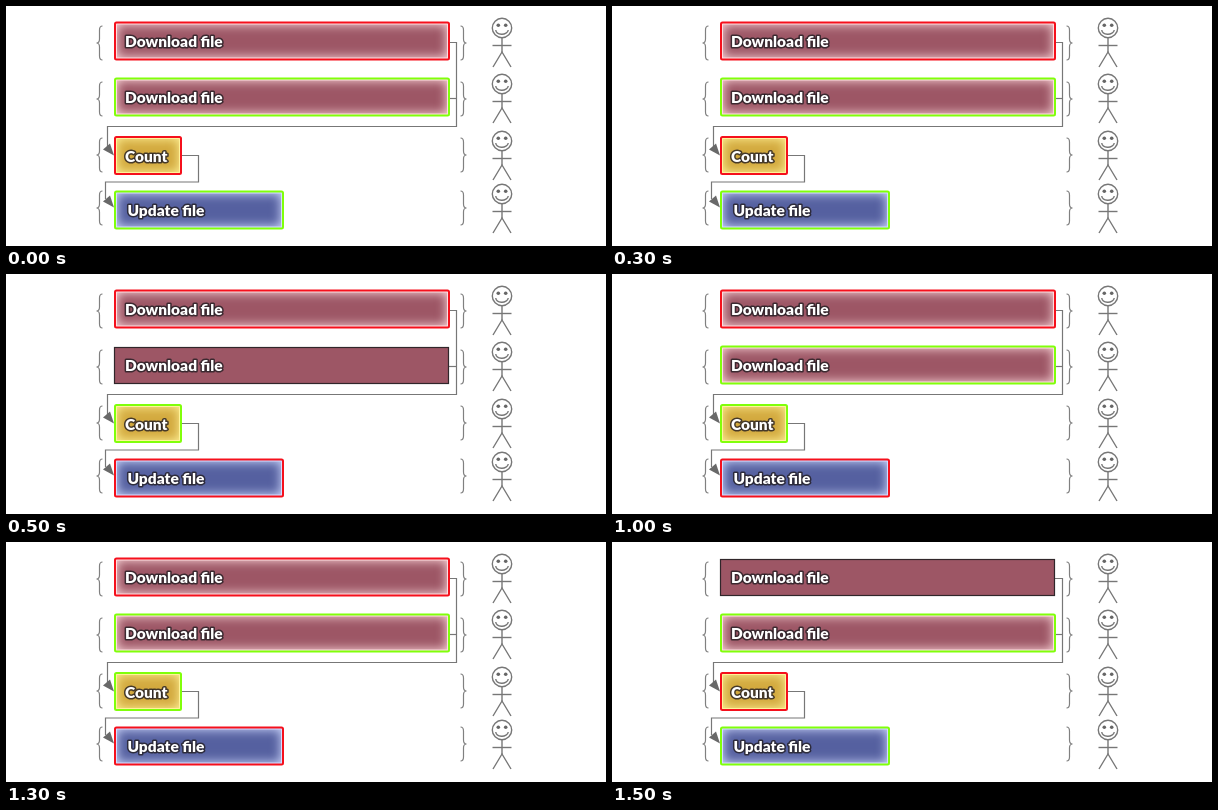
Animation of 600 by 240 pixels, one loop 2000 ms. Source, as an HTML page with a canvas:

```html
<!DOCTYPE html>
<html lang="en">
<head>
<meta charset="utf-8">
<title>Task pipeline</title>
<style>
  html, body { margin: 0; width: 100%; height: 100%; overflow: hidden; background: #fff; }
  canvas { display: block; }
</style>
</head>
<body>
<canvas id="stage" width="600" height="240"></canvas>
<script>
const ctx = document.getElementById('stage').getContext('2d');
const STEP = 500;
const RED = '#f5101c', GREEN = '#80ff0a', GRAY = '#777';
const pink = { fill: '#9d5665', glow: '#ffdcdf' };
const gold = { fill: '#d3a93e', glow: '#fff39a' };
const blue = { fill: '#5560a0', glow: '#d3dcff' };

// One highlight per step; null leaves the bar without a glow.
const bars = [
  { y: 15.5, w: 336, tone: pink, label: 'Download file', textX: 119, base: 40.5, lights: [RED, RED, RED, null] },
  { y: 71.5, w: 336, tone: pink, label: 'Download file', textX: 119, base: 96.5, lights: [GREEN, null, GREEN, GREEN] },
  { y: 130, w: 68, tone: gold, label: 'Count', textX: 119, base: 156, lights: [RED, GREEN, GREEN, RED] },
  { y: 184.5, w: 170, tone: blue, label: 'Update file', textX: 121.5, base: 210, lights: [GREEN, RED, RED, GREEN] }
];
const BAR_X = 108, BAR_H = 39;
const braceY = [20, 76, 132, 185];
const headY = [22, 78, 135, 188];

function polyline(points, width = 1.2) {
  ctx.beginPath();
  points.forEach(([x, y]) => ctx.lineTo(x, y));
  ctx.strokeStyle = GRAY;
  ctx.lineWidth = width;
  ctx.stroke();
}

function arrowhead(x, y) {
  ctx.beginPath();
  ctx.moveTo(x, y);
  ctx.lineTo(x - 11, y - 6);
  ctx.lineTo(x - 4, y - 12);
  ctx.fillStyle = '#686868';
  ctx.fill();
}

function brace(x, y, dir) {
  const mid = y + 17, end = y + 34;
  ctx.beginPath();
  ctx.moveTo(x + 3 * dir, y);
  ctx.quadraticCurveTo(x, y, x, y + 4);
  ctx.lineTo(x, mid - 4);
  ctx.quadraticCurveTo(x, mid, x - 3 * dir, mid);
  ctx.quadraticCurveTo(x, mid, x, mid + 4);
  ctx.lineTo(x, end - 4);
  ctx.quadraticCurveTo(x, end, x + 3 * dir, end);
  ctx.strokeStyle = '#808080';
  ctx.lineWidth = 1.2;
  ctx.stroke();
}

function circle(x, y, r) {
  ctx.beginPath();
  ctx.arc(x, y, r, 0, Math.PI * 2);
}

function stickFigure(x, y) {
  ctx.strokeStyle = GRAY;
  ctx.lineWidth = 1.4;
  circle(x, y, 9.7);
  ctx.stroke();
  ctx.beginPath();
  ctx.ellipse(x, y + 1.5, 6.3, 4.8, 0, 0.1, Math.PI - 0.1);
  ctx.stroke();
  ctx.fillStyle = '#666';
  for (const side of [-3.7, 3.7]) {
    circle(x + side, y - 2.8, 1.8);
    ctx.fill();
  }
  polyline([[x, y + 10], [x, y + 24]], 1.4);
  polyline([[x - 9.5, y + 17.5], [x + 9.5, y + 17.5]], 1.4);
  polyline([[x - 9, y + 39], [x, y + 24], [x + 9, y + 39]], 1.4);
}

function innerGlow(x, y, w, h, color) {
  ctx.save();
  ctx.beginPath();
  ctx.rect(x, y, w, h);
  ctx.clip();
  ctx.shadowColor = color;
  ctx.shadowBlur = 11;
  ctx.fillStyle = color;
  // The casting edge sits inside the border, so the rim stays fully lit.
  ctx.beginPath();
  ctx.rect(x - 30, y - 30, w + 60, h + 60);
  ctx.rect(x + 2, y + 2, w - 4, h - 4);
  ctx.fill('evenodd');
  ctx.restore();
}

function drawBar({ y, w, tone, label, textX, base, lights }, step) {
  const light = lights[step];
  const inner = [BAR_X + 1, y + 1, w - 2, BAR_H - 2];
  ctx.fillStyle = tone.fill;
  if (light) {
    ctx.fillRect(...inner);
    innerGlow(...inner, tone.glow);
    ctx.strokeStyle = light;
    ctx.lineWidth = 2;
    ctx.beginPath();
    ctx.roundRect(...inner, 1.5);
    ctx.stroke();
  } else {
    const plain = [BAR_X + 0.5, y + 2, w - 2, BAR_H - 3];
    ctx.fillRect(...plain);
    ctx.strokeStyle = '#30262a';
    ctx.lineWidth = 1.2;
    ctx.strokeRect(...plain);
  }

  ctx.font = '900 15.5px Lato, sans-serif';
  ctx.lineJoin = 'round';
  ctx.strokeStyle = 'rgba(35,30,35,0.8)';
  ctx.lineWidth = 3;
  ctx.strokeText(label, textX, base);
  ctx.fillStyle = '#fff';
  ctx.fillText(label, textX, base);
  ctx.lineJoin = 'miter';
}

function draw(step) {
  ctx.fillStyle = '#fff';
  ctx.fillRect(0, 0, 600, 240);

  polyline([[443, 36.5], [450.5, 36.5], [450.5, 120.5], [101.5, 120.5], [101.5, 141]]);
  polyline([[443, 92.5], [450.5, 92.5]]);
  polyline([[176, 149.5], [192.5, 149.5], [192.5, 176], [99.5, 176], [99.5, 193]]);

  braceY.forEach(y => {
    brace(93.5, y, 1);
    brace(457.5, y, -1);
  });
  headY.forEach(y => stickFigure(496, y));
  bars.forEach(bar => drawBar(bar, step));
  arrowhead(108, 149.5);
  arrowhead(108, 201.5);
}

const start = performance.now();
function tick() {
  draw(Math.floor((performance.now() - start) / STEP) % 4);
  requestAnimationFrame(tick);
}
tick();
</script>
</body>
</html>
```
